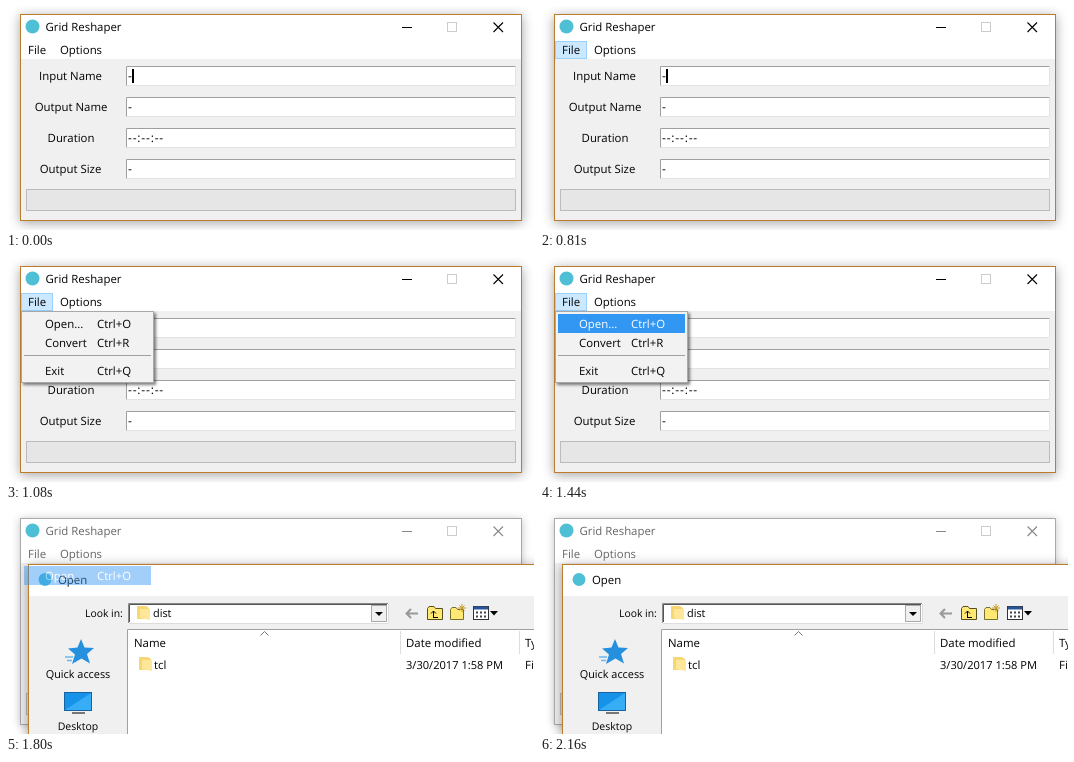
These frames come from a looping animation (528x224 px, 3.16 s). An HTML page:

```html
<!DOCTYPE html>
<html lang="en">
<head>
<meta charset="utf-8">
<title>Converter window</title>
<style>
html, body { margin: 0; width: 528px; height: 224px; overflow: hidden; background: #fff; }
svg { display: block; }
text { font: 11.4px "Open Sans", "Noto Sans", sans-serif; fill: #000; white-space: pre; text-rendering: geometricPrecision; }
.mid { text-anchor: middle; }
.small text, text.small { font-size: 10.9px; }
.dash { font-size: 12px; letter-spacing: .8px; }
.pick text { fill: #fff; }
.line { fill: none; stroke: #000; }

/* one shared 3160 ms clock, hard steps */
.frame, .title, .glyph, .caret, .hot, .menu, .sel, .ghost, .dialog {
  animation: 3160ms step-end infinite;
}
.frame { animation-name: frame; }
.title { animation-name: title; }
.glyph { animation-name: glyph; fill: none; }
.caret { animation-name: caret; }
.hot { animation-name: hot; }
.menu { animation-name: menu; }
.sel { animation-name: sel; }
.ghost { animation-name: ghost; }
.dialog { animation-name: dialog; }

@keyframes frame {
  0% { stroke: #bd7c2b; filter: drop-shadow(0 2px 6px rgba(0,0,0,.36)); }
  54.113%, 100% { stroke: #aaa; filter: drop-shadow(0 1px 4px rgba(0,0,0,.24)); }
}
@keyframes title { 0% { fill: #000; } 54.113%, 100% { fill: #666; } }
@keyframes glyph { 0% { stroke: #000; } 54.113%, 100% { stroke: #888; } }
@keyframes caret {
  0% { opacity: 1; } 2.848% { opacity: 0; } 11.392% { opacity: 1; } 54.113%, 100% { opacity: 0; }
}
@keyframes hot {
  0% { opacity: 0; } 17.088% { opacity: 1; } 54.113%, 100% { opacity: 0; }
}
@keyframes menu {
  0% { opacity: 0; } 28.481% { opacity: .45; } 31.329% { opacity: .9; }
  34.177% { opacity: 1; } 54.113%, 100% { opacity: 0; }
}
@keyframes sel { 0% { opacity: 0; } 39.873% { opacity: 1; } 54.113%, 100% { opacity: 0; } }
@keyframes ghost {
  0% { opacity: 0; } 54.113% { opacity: .72; } 56.962% { opacity: .45; }
  59.81% { opacity: .2; } 62.658%, 100% { opacity: 0; }
}
@keyframes dialog { 0% { opacity: 0; } 56.962%, 100% { opacity: 1; } }
</style>
</head>
<body>
<svg width="528" height="224" viewBox="0 0 528 224">
  <defs>
    <g id="entry">
      <rect width="390" height="20" fill="#fff"/>
      <path d="M.5 19.5V.5H389.5" class="line" style="stroke:#a0a0a0"/>
      <path d="M389.5 1V19.5H1" class="line" style="stroke:#e3e3e3"/>
    </g>
    <g id="folder">
      <path d="M0 0H9L12 2V13H0Z" fill="#f7d774"/>
      <path d="M3 3H13V14L3 12Z" fill="#ffe79a"/>
    </g>
    <g id="open" class="pick">
      <rect x="18" y="56" width="127" height="19" fill="#3296f3"/>
      <text x="39" y="70">Open...</text>
      <text x="91" y="70">Ctrl+O</text>
    </g>
  </defs>

  <!-- main window -->
  <rect class="frame" x="14.5" y="8.5" width="501" height="206" fill="#f0f0f0"/>
  <rect x="15" y="9" width="500" height="44" fill="#fff"/>
  <circle cx="26.5" cy="20.5" r="7" fill="#4fbfd6"/>
  <text class="title" x="39.5" y="25">Grid Reshaper</text>
  <path class="glyph" d="M396 21.5H406M487.5 16.5L497 26M497 16.5L487.5 26" stroke-width="1.1"/>
  <rect x="441.5" y="16.5" width="9" height="9" fill="none" stroke="#ccc"/>
  <rect class="hot" x="15.5" y="35.5" width="31" height="17" fill="#cce8ff" stroke="#99d1ff"/>
  <text class="title" x="22" y="48">File</text>
  <text class="title" x="54" y="48">Options</text>

  <use href="#entry" x="120" y="60"/>
  <use href="#entry" x="120" y="91"/>
  <use href="#entry" x="120" y="122"/>
  <use href="#entry" x="120" y="153"/>
  <g class="mid">
    <text x="64.5" y="74">Input Name</text>
    <text x="65" y="105">Output Name</text>
    <text x="65" y="136">Duration</text>
    <text x="64.5" y="167">Output Size</text>
  </g>
  <text class="dash" x="122" y="74">-</text>
  <text class="dash" x="122" y="105">-</text>
  <text class="dash" x="122" y="136">--:--:--</text>
  <text class="dash" x="122" y="167">-</text>
  <rect class="caret" x="126" y="63" width="2" height="14"/>
  <rect x="20.5" y="183.5" width="489" height="21" fill="#e6e6e6" stroke="#bcbcbc"/>

  <!-- File menu -->
  <g class="menu">
    <rect x="15.5" y="53.5" width="132" height="71" fill="#f2f2f2" stroke="#a8a8a8"
      style="filter:drop-shadow(2px 2px 1.5px rgba(0,0,0,.5))"/>
    <text x="39" y="70">Open...</text>
    <text x="91" y="70">Ctrl+O</text>
    <text x="39" y="89">Convert</text>
    <text x="91" y="89">Ctrl+R</text>
    <path d="M18 97.5H145" class="line" style="stroke:#a0a0a0"/>
    <text x="39" y="117">Exit</text>
    <text x="91" y="117">Ctrl+Q</text>
    <use class="sel" href="#open"/>
  </g>

  <!-- Open dialog -->
  <g class="dialog">
    <rect x="22.5" y="54.5" width="530" height="200" fill="#f0f0f0" stroke="#bd7c2b"
      style="filter:drop-shadow(0 2px 6px rgba(0,0,0,.36))"/>
    <rect x="23" y="55" width="505" height="31" fill="#fff"/>
    <circle cx="39" cy="69.5" r="6.5" fill="#4fbfd6"/>
    <text x="52" y="74">Open</text>

    <text x="79" y="107" style="font-size:10.4px">Look in:</text>
    <rect x="122" y="93" width="261" height="21" fill="#fff"/>
    <path d="M122.5 113V93.5H382" class="line" style="stroke:#888"/>
    <path d="M123.5 112V94.5H381" class="line" style="stroke:#555"/>
    <path d="M382.5 94V113.5H123" class="line" style="stroke:#ddd"/>
    <use href="#folder" x="131" y="96"/>
    <text class="small" x="147" y="107">dist</text>
    <rect x="365.5" y="95.5" width="15" height="16" fill="#f0f0f0" stroke="#aaa"/>
    <path d="M369 102H377L373 106Z"/>

    <!-- toolbar -->
    <path d="M412 103.5H401M405 99L400.5 103.5L405 108" class="line" style="stroke:#999;stroke-width:2"/>
    <path d="M421.5 109.5V98.5L423 96.5H428L429.5 98.5H436.5V109.5Z" fill="#ffe873" stroke="#55501c"/>
    <path d="M427 107.500H432M427.500 107V101M425 103.500L427.500 101L430 103.500" class="line"/>
    <path d="M444.500 109.500V99.500L446 97.500H450L451.500 99.500H457.500V109.500Z" fill="#ffe873" stroke="#77702e"/>
    <path d="M456 94V102M452 98H460M453.500 95.500L458.500 100.500M458.500 95.500L453.500 100.500" class="line" style="stroke:#c49a22"/>
    <rect x="467.500" y="96.500" width="15" height="13" fill="#fff" stroke="#333"/>
    <path d="M468 98H482" class="line" style="stroke:#28549b;stroke-width:3"/>
    <path d="M470 102.500H481M470 106.500H481" class="line" style="stroke:#444;stroke-width:2;stroke-dasharray:2 2"/>
    <path d="M484 101H492L488 105.500Z"/>

    <!-- places -->
    <path d="M75 129L78.500 137.500L88 138L81 144L84 153.500L75.500 148.500L66 154L69 144.500L62 138.500L71.500 137.500Z" fill="#2590dd"/>
    <path d="M59 147H67M61 150.500H66" class="line" style="stroke:#68b8ee;stroke-width:1.500"/>
    <rect x="58.500" y="182.500" width="27" height="18" fill="#1693e8" stroke="#17639f"/>
    <path d="M59 200L85 183V200Z" fill="#37adf5"/>
    <path d="M66 203H79" class="line" style="stroke:#777;stroke-width:2"/>
    <g class="mid small">
      <text x="72" y="167.500">Quick access</text>
      <text x="72" y="220" style="font-size:10.500px">Desktop</text>
    </g>

    <!-- file list -->
    <rect x="121" y="119" width="407" height="105" fill="#fff"/>
    <path d="M121.500 224V119.500H528" class="line" style="stroke:#a0a0a0"/>
    <path d="M254.500 125.500L258.500 121.500L262.500 125.500" class="line" style="stroke:#777"/>
    <path d="M394.500 121V144M513.500 121V144" class="line" style="stroke:#ddd"/>
    <text x="128" y="137">Name</text>
    <text x="400" y="137">Date modified</text>
    <text x="519" y="137">Type</text>
    <use href="#folder" x="133" y="147"/>
    <text x="148" y="159">tcl</text>
    <text x="400" y="159" style="font-size:11.100px">3/30/2017 1:58 PM</text>
    <text x="519" y="159">File folder</text>
  </g>

  <use class="ghost" href="#open"/>
</svg>
</body>
</html>
```
